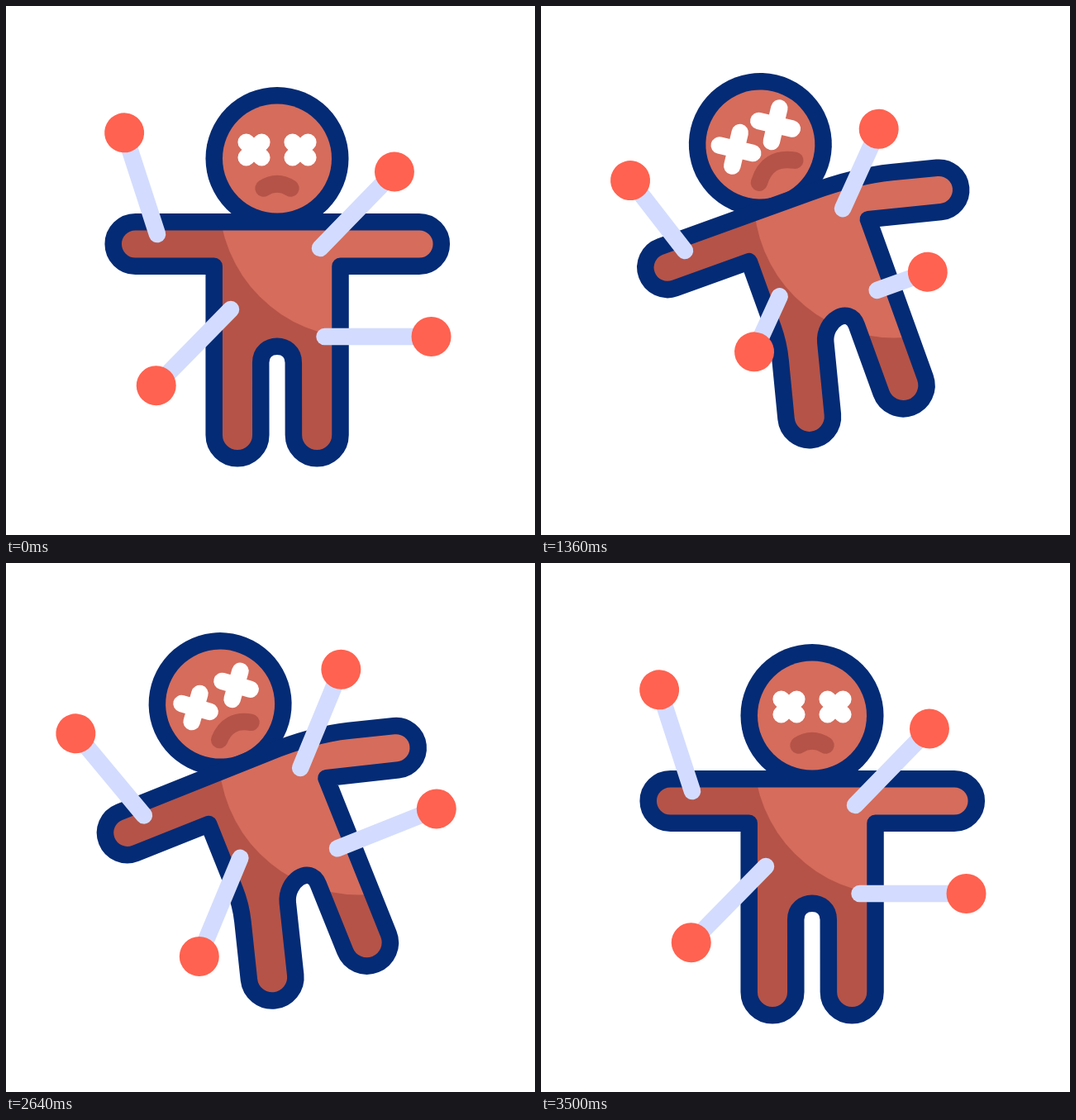
An HTML page with a canvas that plays this animation: 640 px wide and 640 px high, repeating every 3.6 s.

```html
<!DOCTYPE html>
<html>
<head>
<meta charset="utf-8">
<style>
html, body { margin: 0; width: 100%; height: 100%; overflow: hidden; background: #fff; }
canvas { display: block; }
</style>
</head>
<body>
<canvas id="stage" width="640" height="640"></canvas>
<script>
const ctx = document.getElementById('stage').getContext('2d');
const LOOP = 3600, RAD = Math.PI / 180, PI = Math.PI;
const NAVY = '#042b75', LIGHT = '#d56c5c', DARK = '#b55348', STICK = '#d3dcfe', BALL = '#ff6250';

// Smooth monotone curve through [time, value] pairs
function track(...keys) {
  const n = keys.length / 2, T = i => keys[2 * i], V = i => keys[2 * i + 1];
  const slope = i => (V(i + 1) - V(i)) / (T(i + 1) - T(i));
  const tangent = i => {
    if (i === 0 || i === n - 1) return 0;
    const a = slope(i - 1), b = slope(i);
    return a * b > 0 ? 2 * a * b / (a + b) : 0;
  };
  return t => {
    if (t <= T(0)) return V(0);
    if (t >= T(n - 1)) return V(n - 1);
    let i = 0;
    while (t > T(i + 1)) i++;
    const d = T(i + 1) - T(i), u = (t - T(i)) / d, w = 1 - u;
    return V(i) * w * w * (1 + 2 * u) + V(i + 1) * u * u * (3 - 2 * u)
      + d * u * w * (tangent(i) * w - tangent(i + 1) * u);
  };
}

const tilt = track(700, 0, 1040, -11.7, 1180, -17, 1720, -23.8, 2360, -30.2, 2460, -32, 2800, -8, 2860, -4.3, 3100, 0);
const shiftX = track(700, 0, 1040, 6.9, 1180, 6, 1720, -.6, 2360, -10, 2460, -12, 2800, 6, 2860, 6.4, 3200, 0);
const shiftY = track(700, 0, 1040, -23, 1180, -30, 1720, -36.8, 2360, -41, 2500, -41, 2800, -5, 2860, 2.9, 3090, 28.5, 3360, 5, 3490, 0);
const pain = track(700, 0, 1040, .82, 1300, 1, 2400, 1, 2860, .14, 3060, 0);

// Each pin: entry point, direction, offset and turn while pulled out, visible length
const pins = [
  { x: 183, y: 276, angle: -108,
    dx: track(120, 0, 500, -20, 700, 10, 800, 0),
    dy: track(120, 0, 500, -42, 700, -23, 800, 0),
    turn: track(120, 0, 500, -14, 700, -10, 800, 0),
    length: track(770, 129, 920, 68, 1040, 79, 1450, 110, 1680, 84, 1720, 85, 2260, 91, 2360, 103, 2480, 129) },
  { x: 380, y: 293, angle: -45.8,
    dx: track(120, 0, 560, 12, 700, 1.5, 860, 0),
    dy: track(120, 0, 620, -68, 700, -65, 860, 0),
    turn: track(120, 0, 620, 17.4, 700, 17.4, 860, 0),
    length: track(840, 129, 980, 80, 1040, 88, 1400, 106, 1720, 98, 1960, 74, 2360, 84, 2480, 129) },
  { x: 272, y: 367, angle: 134.4,
    dx: track(120, 0, 660, -102, 700, -100, 980, 0),
    dy: track(120, 0, 700, 40, 980, 0),
    turn: track(120, 0, 700, -43.3, 980, 0),
    length: track(960, 129, 1040, 116, 1180, 70, 1720, 84, 2200, 68, 2360, 70, 2500, 129) },
  { x: 385.5, y: 400, angle: 0,
    dx: track(120, 0, 640, 33, 840, 33, 1040, 13, 1100, 0),
    dy: track(120, 0, 640, 14, 700, 14, 1040, 0),
    turn: track(120, 0, 640, 20.9, 700, 20.9, 1040, 5.4, 1100, 0),
    length: track(1080, 129, 1180, 102, 1280, 65, 1720, 67, 1950, 95, 2360, 88, 2500, 129) }
];

const around = (px, py, a) => (x, y) => [
  px + (x - px) * Math.cos(a) - (y - py) * Math.sin(a),
  py + (x - px) * Math.sin(a) + (y - py) * Math.cos(a)
];

function turnAt(x, y, a) {
  ctx.translate(x, y);
  ctx.rotate(a);
}

function disc(x, y, r, color) {
  ctx.beginPath();
  ctx.arc(x, y, r, 0, 2 * PI);
  ctx.fillStyle = color;
  ctx.fill();
}

function line(x1, y1, x2, y2) {
  ctx.moveTo(x1, y1);
  ctx.lineTo(x2, y2);
}

function stroke(color, width) {
  ctx.strokeStyle = color;
  ctx.lineWidth = width;
  ctx.stroke();
}

function drawHead(p) {
  ctx.save();
  turnAt(328, 259, -12 * p * RAD);
  ctx.translate(0, -74.5);
  disc(0, 0, 86.5, NAVY);
  disc(0, 0, 66, LIGHT);

  const r = (13.2 + 7.6 * p) * Math.SQRT1_2;
  ctx.beginPath();
  for (const x of [-28, 28]) {
    line(x - r, -10.5 - r, x + r, -10.5 + r);
    line(x - r, -10.5 + r, x + r, -10.5 - r);
  }
  stroke('#fff', 20.5);

  const w = 16.5 + 9 * p, y = 36 + 2.5 * p;
  ctx.beginPath();
  ctx.moveTo(-w, y);
  ctx.quadraticCurveTo(0, y - 10.5 - 12 * p, w, y);
  stroke(DARK, 20.5);
  ctx.restore();
}

function drawBody(bend) {
  const arm = around(406, 288, bend), leg = around(280, 424, bend), bulge = Math.tan(bend / 2);
  ctx.beginPath();
  ctx.moveTo(156.5, 261.2);
  ctx.lineTo(350, 261.2);
  ctx.quadraticCurveTo(406 + 26.8 * bulge, 261.2, ...arm(445, 261.2));
  ctx.arc(...arm(500, 288), 26.8, bend - PI / 2, bend + PI / 2);
  ctx.lineTo(404.5, 288 + 26.8 / Math.cos(bend));
  ctx.arc(376.2, 519, 28.3, 0, PI);
  ctx.lineTo(347.8, 431.5);
  ctx.bezierCurveTo(347.8, 405.1, ...leg(308.2, 405.1), ...leg(308.2, 431.5));
  ctx.arc(...leg(280, 519), 28.3, bend, bend + PI);
  ctx.lineTo(...leg(251.7, 448));
  ctx.quadraticCurveTo(251.7, 424 - 28.3 * bulge, 251.7, 400);
  ctx.lineTo(251.7, 314.8);
  ctx.arc(156.5, 288, 26.8, PI / 2, 3 * PI / 2);
  ctx.closePath();
  ctx.fillStyle = DARK;
  ctx.fill();
  const outline = ctx.getTransform();

  // The lit area stays put while the doll moves through it
  ctx.save();
  ctx.clip();
  const body = bodyPath => bodyPath;
  ctx.resetTransform();
  ctx.fillStyle = LIGHT;
  const lit = new Path2D();
  lit.arc(427, 232, 169.5, 0, 2 * PI);
  ctx.fill(lit);
  ctx.restore();
  ctx.setTransform(outline);
  stroke(NAVY, 20.5);
}

function drawPin(pin, t) {
  ctx.save();
  turnAt(pin.x + pin.dx(t), pin.y + pin.dy(t), (pin.angle + pin.turn(t)) * RAD);
  const length = pin.length(t);
  ctx.beginPath();
  line(0, 0, length, 0);
  stroke(STICK, 20.5);
  disc(length, 0, 24, BALL);
  ctx.restore();
}

function draw(now) {
  const t = now % LOOP, angle = tilt(t) * RAD;
  ctx.resetTransform();
  ctx.fillStyle = '#fff';
  ctx.fillRect(0, 0, 640, 640);
  ctx.lineCap = ctx.lineJoin = 'round';
  turnAt(328 + shiftX(t), 340 + shiftY(t), angle);
  ctx.translate(-328, -340);
  drawHead(pain(t));
  drawBody(-.72 * angle);
  pins.forEach(pin => drawPin(pin, t));
}

const start = performance.now();
function tick() {
  draw(performance.now() - start);
  requestAnimationFrame(tick);
}
tick();
</script>
</body>
</html>
```
